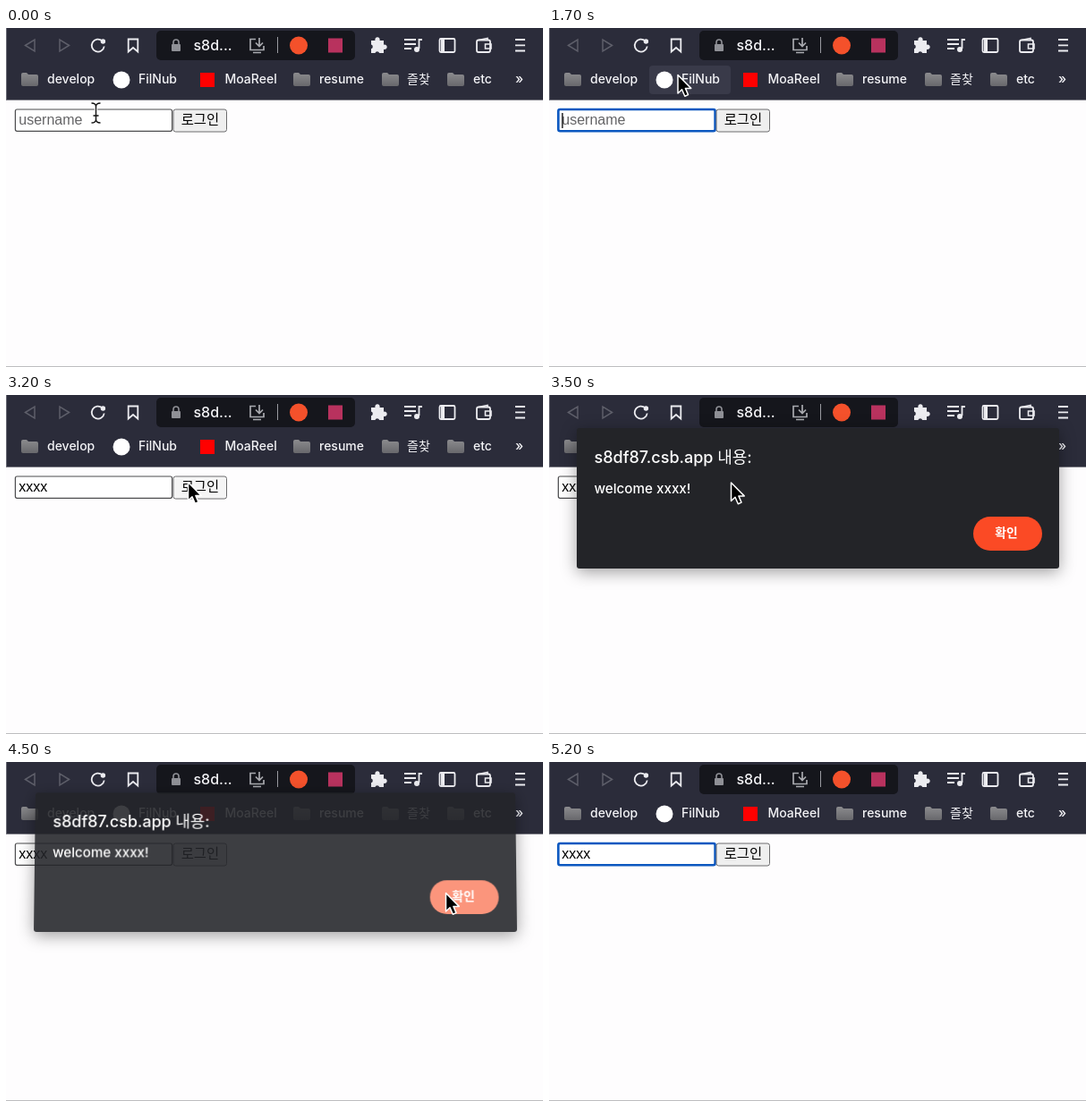
An HTML page that plays this animation: 600x379 px, repeating every 5.6 s.

```html
<!DOCTYPE html>
<html lang="ko">
<head>
<meta charset="utf-8">
<style>
html, body { margin: 0; width: 100%; height: 100%; overflow: hidden; background: #fefdfe; }
svg { position: absolute; left: 0; top: 0; }
text, #dialog { font-family: Inter, "Noto Sans CJK KR", "Noto Sans CJK", sans-serif; font-weight: 500; }
.marks { font-size: 14px; fill: #f4f4f7; }
.page text { font: 16px "Liberation Sans", Arial, sans-serif; }
.page .ko { font: 500 15.4px "Noto Sans CJK KR", "Noto Sans CJK", sans-serif; }
.line { fill: none; stroke: #ececf0; stroke-width: 1.8; }
#dialog {
  position: absolute; left: 30.5px; top: 37px; width: 539.5px; height: 157px; border-radius: 3px;
  background: #232428; color: #fff; transform-origin: 50% 100%;
  box-shadow: 0 4px 18px rgba(0,0,0,.38);
}
#dialog div { position: absolute; left: 20px; white-space: pre; line-height: 24px; }
#dialog .title { top: 21px; font-size: 18px; }
#dialog .message { top: 56px; font-size: 15.2px; }
#dialog #ok {
  left: 443px; top: 99px; width: 77px; height: 38px; border-radius: 19px;
  line-height: 37px; text-align: center; text-indent: -2px; font-size: 13.8px; font-weight: 700;
}
</style>
</head>
<body>
<svg width="600" height="379">
  <defs>
    <linearGradient id="grey" x2="0" y2="1"><stop stop-color="#8b8b8e"/><stop offset="1" stop-color="#68686c"/></linearGradient>
    <path id="folder" d="M0 2q0-2 2-2h4l2 2h9q2 0 2 2v9q0 2-2 2H2q-2 0-2-2z" fill="url(#grey)"/>
  </defs>
  <rect width="600" height="80.6" fill="#2b2c3a"/>
  <path d="M.5 0V80" stroke="#6a6b75"/>
  <path d="M0 378.5H600" stroke="#bdbdbf"/>

  <!-- toolbar -->
  <path d="M21.5 19.5L32 13V26ZM70.5 19.5L60 13V26Z" class="line" style="stroke:#5d5e69;stroke-width:1.5"/>
  <g id="reload">
    <path d="M107.5 14.4A7 7 0 1 0 109.7 20.5" class="line"/>
    <circle cx="108.4" cy="15" r="2.7" fill="#ececf0"/>
  </g>
  <path id="stop" d="M97 13.5L109 25.5M109 13.5L97 25.5" class="line"/>
  <path d="M136.7 12.5H147.3V26.5L142 22L136.7 26.5Z" class="line"/>
  <rect x="168" y="3" width="222" height="33" rx="5" fill="#15161c"/>
  <rect x="185" y="18" width="10" height="8" rx="1" fill="#8f9096"/>
  <path d="M187 18V16a3 3 0 0 1 6 0V18" class="line" style="stroke:#8f9096;stroke-width:1.6"/>
  <text x="209.5" y="25" font-size="16" fill="#f4f4f7">s8d...</text>
  <path d="M279 12.5H273V24.5H288V20M276 27.5H285M283 11V20M279 16.5L283 20.5L287 16.5" class="line" style="stroke:#a9aaaf;stroke-width:1.7"/>
  <path d="M303.5 10V28" stroke="#9a9ba1"/>
  <circle cx="327" cy="19.5" r="10" fill="#f4512b"/>
  <rect x="360" y="11.5" width="16" height="16" fill="#b8325e"/>
  <path d="M408 14h4.5a2.7 2.7 0 1 1 5 0H422v4.7a2.7 2.7 0 1 1 0 5V28h-4.8a2.5 2.5 0 0 0-4.8 0H408v-4.7a2.5 2.5 0 0 0 0-4.8z" fill="#ececf0"/>
  <path d="M445 13H458M445 18H458M445 23H453M461.5 23V13H465" class="line"/>
  <circle cx="459" cy="24" r="3" fill="#ececf0"/>
  <rect x="484.5" y="12" width="17" height="15" rx="1.5" class="line"/>
  <path d="M486 13H490V26H486Z" fill="#ececf0"/>
  <rect x="526" y="13.5" width="15" height="13.5" rx="2" class="line"/>
  <path d="M528 13.5L538 11.5V13M542 18H535.5V23H542Z" class="line" style="stroke-width:1.6"/>
  <path d="M569 13H580M569 19.3H580M569 25.5H580" class="line"/>

  <!-- bookmarks -->
  <rect id="hover" x="112" y="42" width="91" height="32" rx="4" fill="#393a49"/>
  <g class="marks">
    <use href="#folder" x="17" y="50"/><text x="46" y="62.3">develop</text>
    <circle cx="129" cy="58" r="9.5" fill="#fff"/><text x="148" y="62.3">FilNub</text>
    <rect x="217" y="50" width="16" height="16" fill="#f00"/><text x="244.5" y="62.3">MoaReel</text>
    <use href="#folder" x="321" y="50"/><text x="350" y="62.3">resume</text>
    <use href="#folder" x="420" y="50"/><text x="448" y="62.3">즐찾</text>
    <use href="#folder" x="493" y="50"/><text x="522" y="62.3">etc</text>
    <text x="569" y="62.3" font-size="15">»</text>
  </g>

  <!-- login form -->
  <g class="page">
    <rect id="field" x="10.4" y="91" width="175.2" height="24.3" rx="2" fill="#fff"/>
    <text id="value" x="14.3" y="108"></text>
    <path id="caret" d="M0 95V112" stroke="#000" stroke-width="1.3"/>
    <rect id="login" x="187" y="91" width="59.5" height="25" rx="2.5" stroke="#6c6c6e"/>
    <text class="ko" x="195.7" y="107.5">로그인</text>
  </g>
</svg>

<div id="dialog">
  <div class="title">s8df87.csb.app 내용:</div>
  <div class="message">welcome xxxx!</div>
  <div id="ok">확인</div>
</div>

<svg width="600" height="379">
  <defs>
    <path id="bar" d="M-5-11Q0-11 0-7Q0-11 5-11M0-7V7M-5 11Q0 11 0 7Q0 11 5 11M-3 3H3"/>
  </defs>
  <g id="pointer">
    <path id="arrow" d="M.5 .5V21L5 16.7L8.3 24.2L12 22.6L8.9 15.4H15.2Z" stroke="#fff" stroke-width="1.5" stroke-linejoin="round"/>
    <g id="beam" fill="none">
      <use href="#bar" stroke="#fff" stroke-width="3.4"/>
      <use href="#bar" stroke="#111" stroke-width="1.4"/>
    </g>
  </g>
</svg>

<script>
const LOOP = 5600, STEP = 100;
const $ = id => document.getElementById(id);
const show = (id, on) => $(id).style.display = on ? '' : 'none';
const paint = (id, attrs) => Object.entries(attrs).forEach(([k, v]) => $(id).setAttribute(k, v));

// time, x, y of the pointer
const path = [
  [0, 100.5, 95], [600, 100, 26], [1200, 100, 26], [1500, 158, 50], [1700, 143.5, 52],
  [2200, 147, 55], [2800, 204, 104], [3200, 203, 97], [3500, 203, 97.5],
  [4300, 491, 146], [4600, 491, 146], [5200, 520, 140]
];
const keys = [1900, 2000, 2200, 2300];

function pointerAt(t) {
  const i = path.findIndex(p => p[0] > t);
  if (i < 0) return path[path.length - 1].slice(1);
  const [a, b] = [path[i - 1], path[i]];
  const k = (t - a[0]) / (b[0] - a[0]);
  const ease = k * k * (3 - 2 * k);
  return [1, 2].map(n => a[n] + (b[n] - a[n]) * ease);
}

function draw(t) {
  const within = (from, to) => t >= from && t < to;
  const [x, y] = pointerAt(t);
  const overField = x < 186 && y > 91 && y < 116;
  paint('pointer', { transform: `translate(${x} ${y})` });
  show('pointer', t < 5200);
  show('beam', overField);
  show('arrow', !overField);

  const loading = within(700, 900);
  show('stop', loading);
  show('reload', !loading);
  show('hover', within(1700, 2300));

  const typed = keys.filter(k => t >= k).length;
  const focused = within(1700, 3100) || t >= 4700;
  $('value').textContent = 'x'.repeat(typed) || 'username';
  paint('value', { fill: typed ? '#000' : '#646466' });
  paint('field', { stroke: focused ? '#0b57c0' : '#4c4c4e', 'stroke-width': focused ? 2.6 : 1.2 });
  paint('caret', { transform: `translate(${15 + typed * 8} 0)` });
  show('caret', within(1700, 2800) || within(4700, 5200));
  paint('login', { fill: within(3100, 3500) ? '#f5f5f5' : '#efefef' });

  const closing = t >= 4500;
  const dialog = $('dialog').style;
  show('dialog', within(3500, 4600));
  dialog.background = closing ? 'rgba(35,36,40,.88)' : '#232428';
  dialog.transform = closing ? 'translateY(-4px) perspective(1000px) rotateX(2.7deg)' : 'none';
  $('ok').style.background = closing ? '#fb957c' : t >= 4300 ? '#f3593b' : '#fb4a25';
}

function frame(now) {
  draw(Math.floor(now % LOOP / STEP) * STEP);
  requestAnimationFrame(frame);
}
draw(0);
requestAnimationFrame(frame);
</script>
</body>
</html>
```
